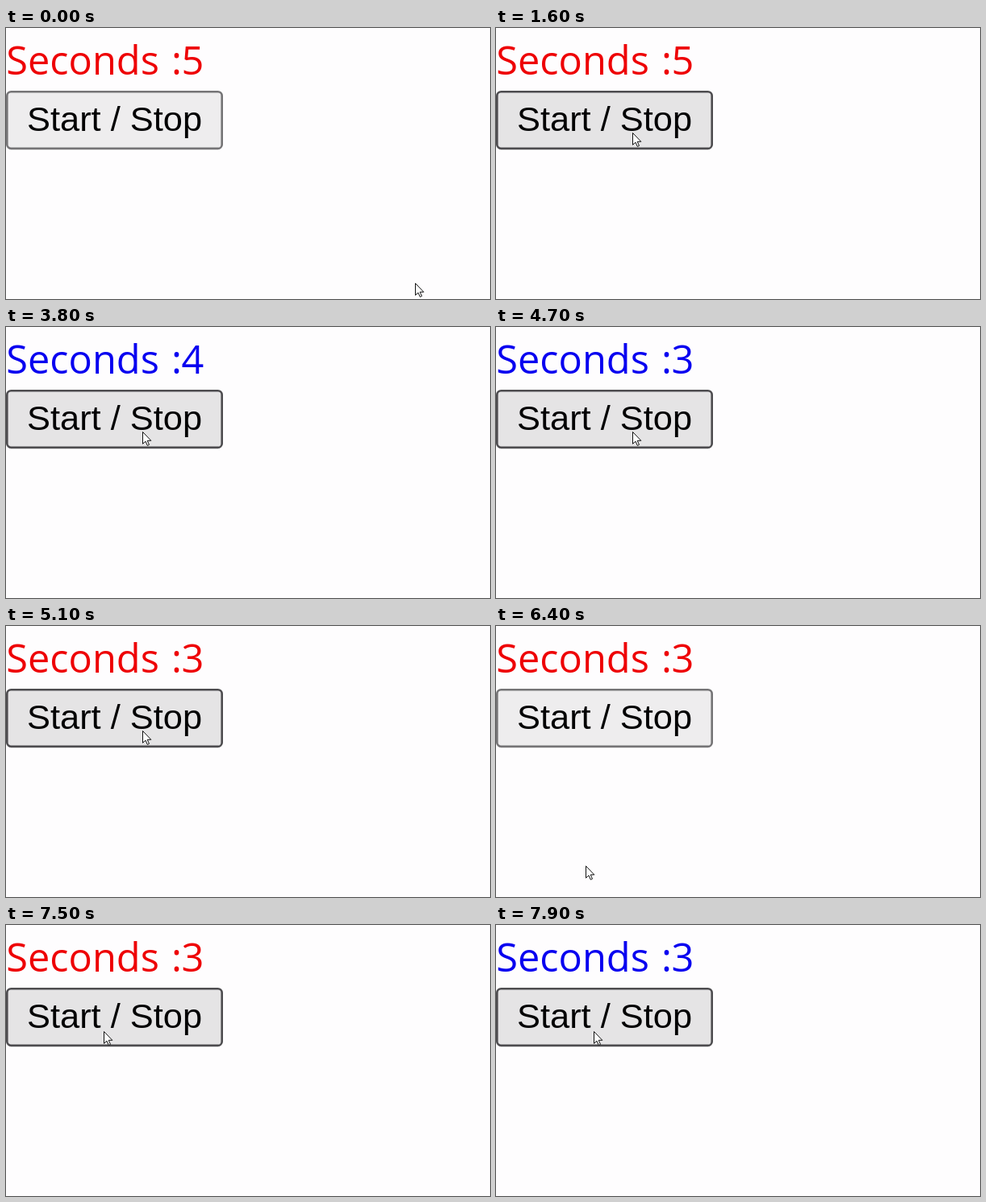
An HTML page for the animation above (8 s loop, 600 by 337 pixels).

```html
<!DOCTYPE html>
<html lang="en">
<head>
<meta charset="utf-8">
<title>Countdown</title>
<style>
  html, body { margin: 0; width: 100%; height: 100%; overflow: hidden; background: #fefdfe; }
  svg { display: block; width: 100vw; height: 100vh; }
  .counter { font: 48.7px "Open Sans", "Noto Sans", sans-serif; }
  .label { font: 43.4px "Liberation Sans", Arial, sans-serif; fill: #030304; }
  .box { fill: #eeedee; stroke: #757476; stroke-width: 2.6; }
  .hover .box { fill: #e5e4e5; stroke: #4d4c4f; }
</style>
</head>
<body>
<svg viewBox="0 0 600 337">
  <g class="counter" id="counter">
    <text x="0.3" y="58">Seconds</text>
    <text x="205" y="58">:</text>
    <text x="217.6" y="58" id="digit">5</text>
  </g>
  <g id="button">
    <rect class="box" x="1.3" y="79.3" width="266.4" height="70.6" rx="5"/>
    <text class="label" x="26" y="128">Start / Stop</text>
  </g>
  <path id="cursor" d="M.5 .5V15.3L4 12.2 6.3 17.4 8.5 16.4 6.2 11.3H10.8Z"
        fill="#fff" stroke="#111" stroke-width="1"/>
</svg>
<script>
const LOOP = 8000, STEP = 100;
const RED = '#ee0004', BLUE = '#0800f0';

// [time, value]: each value holds until the next entry
const colors = [[0, RED], [2600, BLUE], [5000, RED], [7600, BLUE]];
const digits = [[0, 5], [3800, 4], [4600, 3]];

// [time, x, y]: eased between entries
const path = [
  [0, 507, 317], [1400, 507, 317], [1600, 169, 130], [5500, 169, 130],
  [5900, 111, 294], [6100, 111, 294], [6400, 111, 298], [6600, 113, 308],
  [7000, 121, 132], [LOOP, 121, 132]
];

const [counter, digit, button, cursor] =
  ['counter', 'digit', 'button', 'cursor'].map(id => document.getElementById(id));

const held = (table, t) => table.filter(([start]) => start <= t).pop()[1];
const ease = p => p * p * (3 - 2 * p);

function cursorAt(t) {
  const i = path.findIndex(([end]) => end > t);
  const [t0, x0, y0] = path[i - 1], [t1, x1, y1] = path[i];
  const p = ease((t - t0) / (t1 - t0));
  return [x0 + (x1 - x0) * p, y0 + (y1 - y0) * p];
}

function draw(now) {
  const t = Math.floor(now % LOOP / STEP) * STEP;
  const [x, y] = cursorAt(t);
  counter.setAttribute('fill', held(colors, t));
  digit.textContent = held(digits, t);
  cursor.setAttribute('transform', `translate(${Math.round(x)} ${Math.round(y)})`);
  button.classList.toggle('hover', x < 269 && y > 78 && y < 151);
}

const start = performance.now();
function tick() {
  draw(performance.now() - start);
  requestAnimationFrame(tick);
}
tick();
</script>
</body>
</html>
```
